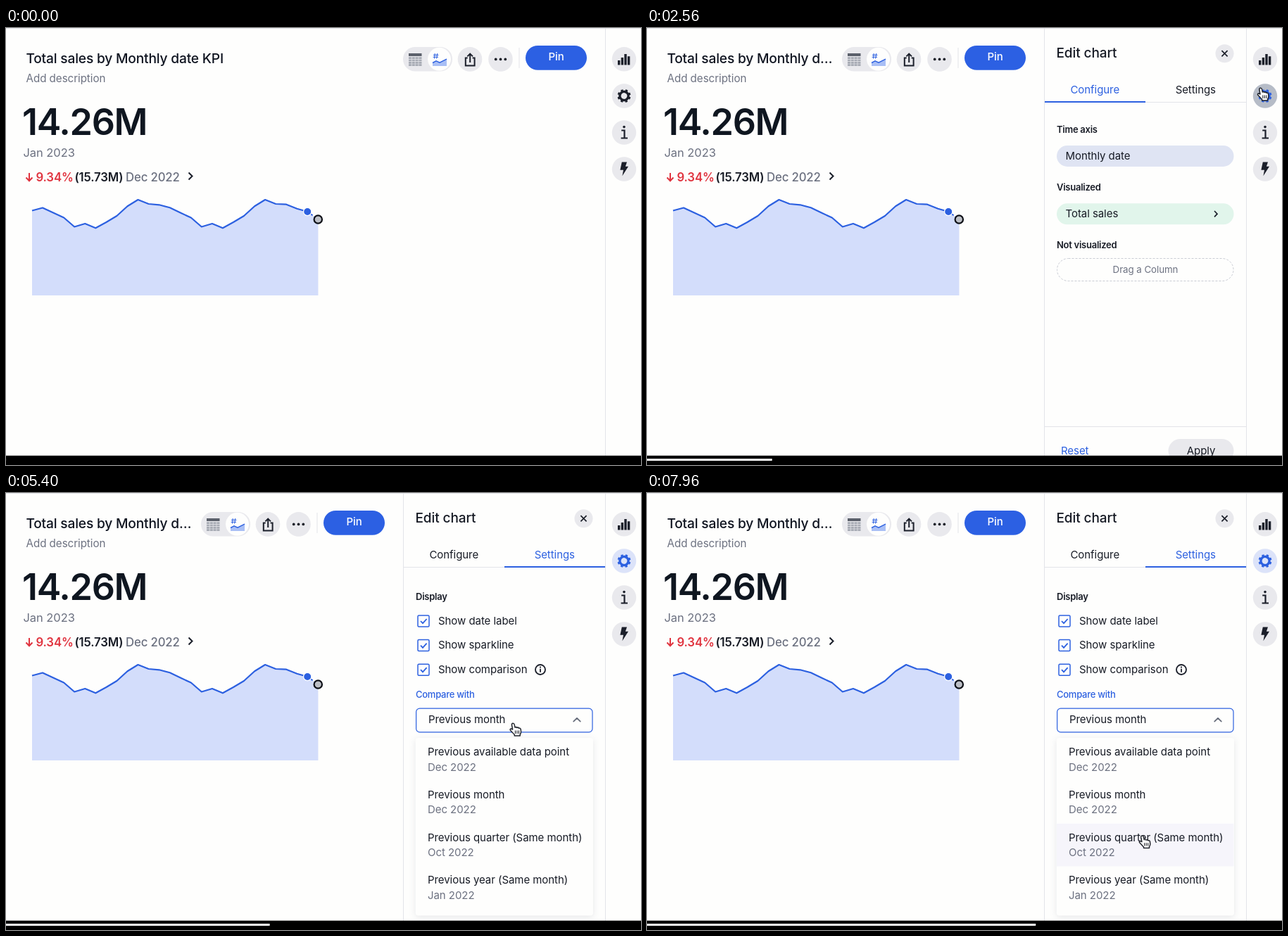
Animation, 902 px wide and 621 px high, one loop 8 s. Source, as an HTML page:

```html
<!DOCTYPE html>
<html lang="en">
<head>
<meta charset="utf-8">
<title>KPI chart settings</title>
<style>
  html, body { margin: 0; width: 100%; height: 100%; overflow: hidden; background: #fefefd; }
  svg { display: block; width: 100%; height: 100%; }
  text {
    font: 400 15px Inter, "Liberation Sans", sans-serif;
    font-optical-sizing: none;
    letter-spacing: -.004em;
    fill: #171b25;
    white-space: pre;
  }
  .title { font-size: 19.2px; font-weight: 500; letter-spacing: -.01em; fill: #0f1420; }
  .total { font-size: 52px; font-weight: 600; letter-spacing: -.025em; fill: #0f1620; }
  .delta { font-size: 16.8px; font-weight: 600; letter-spacing: -.01em; }
  .head { font-size: 19px; font-weight: 500; letter-spacing: -.005em; }
  .label { font-size: 13px; font-weight: 600; letter-spacing: -.02em; }
  .mute { fill: #6c7180; }
  .mid { text-anchor: middle; }
  .blue { fill: #2c60e0; }
  .line { fill: none; stroke: #1b1f2a; stroke-width: 2; }
  .rule { stroke: #e3e4e9; }
  .field { fill: #fefefd; stroke: #b9bfcb; stroke-width: 1.2; }
  .disc { fill: #e9e9ed; }
  .chev { fill: none; stroke: #656b79; stroke-width: 1.7; stroke-linecap: round; stroke-linejoin: round; }
  #menu > rect { filter: drop-shadow(0 2px 5px rgba(30, 35, 60, .11)); }
</style>
</head>
<body>
<svg viewBox="0 0 902 621" preserveAspectRatio="none">
  <rect width="902" height="621" fill="#fefefd"/>

  <text id="title" class="title" x="28.4" y="50.3"></text>
  <text class="mute" x="28.5" y="77" style="font-size:15.2px">Add description</text>
  <text class="total" x="23" y="152">14.26M</text>
  <text class="mute" x="24.5" y="183" style="font-size:16.5px">Jan 2023</text>
  <path class="line" d="M33 206V217M28.5 212.5L33 217.3L37.5 212.5" style="stroke:#e0343f"/>
  <text class="delta" x="42.5" y="218" style="fill:#e0343f">9.34%</text>
  <text class="delta" x="97.5" y="218">(15.73M)</text>
  <text class="delta mute" x="170" y="218" style="font-weight:500">Dec 2022</text>
  <path class="line" d="M259.5 205.5l5 5l-5 5"/>

  <path id="area" fill="#d3ddfb"/>
  <path id="spark" fill="none" stroke="#2c60e0" stroke-width="2.2" stroke-linejoin="round"/>
  <path id="tail" fill="none" stroke="#2c60e0" stroke-width="2" stroke-dasharray="3 3"/>
  <circle cx="428.2" cy="261" r="5.6" fill="#2c60e0" stroke="#fff" stroke-width="1.2"/>
  <circle cx="443.3" cy="272" r="5.7" fill="#bcbfc6" stroke="#0c0f16" stroke-width="2.2"/>

  <g id="tools">
    <rect class="disc" x="564" y="27" width="70" height="34.5" rx="17.2"/>
    <circle cx="615.5" cy="44.3" r="16.5" fill="#fefefd"/>
    <path fill="#5b606b" d="M572 36h18.5v4h-18.5z"/>
    <path fill="none" stroke="#a7abb4" stroke-width="2.6" d="M572 42.6h18.5M572 46h18.5M572 49.4h18.5M572 52.6h18.5"/>
    <path stroke="#e3e3e8" stroke-width=".8" d="M576.4 41v13M581.2 41v13M586 41v13"/>
    <path fill="#a9bff5" d="M606 50l5-2.5l5 2l10-5v9.5h-20z"/>
    <path fill="none" stroke="#2c60e0" stroke-width="1.5" d="M606 49.5l5-2.6l5 2.2l10-5"/>
    <path fill="none" stroke="#2c60e0" stroke-width="1" d="M609.3 36l-.9 7.6M612.6 36l-.9 7.6M607 38.4h7.4M606.6 41.3h7.4"/>
    <circle class="disc" cx="659" cy="44.4" r="17.3"/>
    <path class="line" d="M655.7 42.6H652.8V53.5H665.6V42.6H662.6M659.2 49V37M655.4 40.4L659.2 36.6L663 40.4"/>
    <circle class="disc" cx="702.5" cy="44.4" r="17.3"/>
    <g fill="#1b1f2a"><circle cx="695.7" cy="44.4" r="1.9"/><circle cx="702.5" cy="44.4" r="1.9"/><circle cx="709.3" cy="44.4" r="1.9"/></g>
    <path class="rule" d="M729 28V57"/>
    <rect x="738" y="25" width="87" height="34.8" rx="17.4" fill="#2c60e3"/>
    <text class="mid" x="781.5" y="46.4" style="fill:#fff;font-weight:500">Pin</text>
  </g>

  <g id="panel">
    <rect x="564" y="0" width="288" height="608" fill="#fefefd"/>
    <path class="rule" d="M564.5 1V608M565 105.5H851"/>
    <text class="head" x="581.5" y="42">Edit chart</text>
    <circle class="disc" cx="820.5" cy="36.2" r="13"/>
    <path class="line" d="M816.4 32.1l8.2 8.2M824.6 32.1l-8.2 8.2" style="stroke-width:1.7"/>
    <text id="tabA" class="mid" x="636.3" y="92.5">Configure</text>
    <text id="tabB" class="mid" x="779.3" y="92.5">Settings</text>
    <rect id="underline" y="104" width="143" height="2" fill="#2c60e0"/>

    <g id="configure">
      <text class="label" x="582" y="148.5">Time axis</text>
      <rect x="582" y="167" width="251.5" height="30" rx="15" fill="#dfe4f3"/>
      <text x="594.5" y="186.5">Monthly date</text>
      <text class="label" x="582" y="231">Visualized</text>
      <rect x="582" y="249.3" width="251.5" height="30" rx="15" fill="#e1f5eb"/>
      <text x="594.5" y="269">Total sales</text>
      <path class="line" d="M806 260l4 4.2l-4 4.2" style="stroke-width:1.7"/>
      <text class="label" x="582" y="313.4">Not visualized</text>
      <rect x="582.5" y="327.5" width="250.5" height="32" rx="16" fill="none" stroke="#c9ccd4" stroke-dasharray="3 2"/>
      <text class="mid mute" x="708" y="347.5" style="font-size:13.3px">Drag a Column</text>
      <path class="rule" d="M565 566.5H851"/>
      <text class="blue" x="588" y="605.7">Reset</text>
      <rect class="disc" x="740.5" y="584" width="93" height="34" rx="17"/>
      <text class="mid" x="787" y="605.7">Apply</text>
    </g>

    <g id="settings">
      <text class="label" x="582" y="151.5">Display</text>
      <g id="checks"></g>
      <circle cx="759" cy="251" r="7" fill="none" stroke="#1b1f2a" stroke-width="1.8"/>
      <path d="M759 249.8V254.8M759 246.6V248.4" stroke="#1b1f2a" stroke-width="1.8"/>
      <text id="compare" class="label" x="582" y="291.3">Compare with</text>
      <rect id="select" class="field" x="582.6" y="306.2" width="250.4" height="33.6" rx="5"/>
      <text x="600" y="327.4">Previous month</text>
      <path id="selChev" class="chev"/>
      <text class="label" x="582" y="369.5">Color</text>
      <g id="colors"></g>
      <text class="label" x="582" y="508.2">Max data points</text>
      <rect class="field" x="582.6" y="518.6" width="250.4" height="33.6" rx="5"/>
      <text x="600" y="541">5000</text>
      <text class="mute" x="582" y="567.8" style="font-size:12.7px">Positive values up to 20,000</text>
    </g>

    <g id="menu">
      <rect x="581.7" y="348" width="252.3" height="252.5" rx="4" fill="#fefefd"/>
      <path id="hover" d="M582 0h251.5v60.7h-251.5z" fill="#f6f5fb"/>
      <g id="options"></g>
    </g>
    <g id="tip">
      <rect x="-64" y="-17" width="128" height="34" rx="2" fill="#42454f"/>
      <text class="mid" x="0" y="4.4" style="font-size:12.6px;fill:#fff">Previous month</text>
    </g>
  </g>

  <path class="rule" d="M851.5 1V608M0 .5H902"/>
  <circle class="disc" cx="878" cy="44.3" r="17.2"/>
  <path fill="#1b1f2a" d="M869 46h3.4v6.5h-3.4zM873.7 42h3.4v10.5h-3.4zM878.3 37h3.4v15.5h-3.4zM882.9 40.3h3.4v12.2h-3.4z"/>
  <circle id="gearBack" cx="878" cy="96.5" r="17.2"/>
  <g id="gear" fill="none" transform="translate(878 96.5) rotate(11.25)">
    <circle r="6.1" stroke-width="3.4"/>
    <circle r="8" stroke-width="3" stroke-dasharray="3.1416"/>
  </g>
  <circle class="disc" cx="878" cy="148.5" r="17.2"/>
  <path class="line" d="M874.2 145.5H878.5V156.5M873.6 156.5H883" style="stroke-width:2.2"/>
  <circle cx="878" cy="140.6" r="1.8" fill="#1b1f2a"/>
  <circle class="disc" cx="878" cy="200.5" r="17.2"/>
  <path fill="#1b1f2a" d="M874.8 190.5H882L879.9 196.8H884L875.4 210.2L877 201.8H872.4z"/>

  <rect y="607.7" width="902" height="14" fill="#000"/>
  <rect id="progress" y="612" height="3" fill="#fff"/>

  <g id="cursor">
    <path id="arrow" d="M0 0V15.5L3.6 12.2L6.2 18L8.8 16.9L6.3 11.2H11.2Z" fill="#111" stroke="#fff" stroke-width="1.1"/>
    <g id="hand" transform="translate(-5 -1)" stroke="#22252c" stroke-width="1.5" stroke-linejoin="round">
      <path fill="#fff" d="M4.4 9.6L3.2 3.4Q3 1 4.8 1T7 3L7.7 6.7Q9.4 5.6 10.4 7.1Q12.3 6.2 13.1 7.8Q15.4 7.2 16 9.5L16.3 13Q16.2 15 15 16.6V18.6H7V17Q5.5 15.8 4 13.8L1 10.6Q.5 8.7 2.3 8.6Z"/>
      <path fill="none" stroke-width="1.1" d="M8.2 11.2V15.6M10.7 11.2V15.6M13.2 11.2V15.6"/>
    </g>
  </g>
</svg>
<script>
const LOOP = 8000, FULL = 13005;
const PANEL_AT = 2200, SETTINGS_AT = 3700, MENU_AT = 4620;
const ROW_TOP = 348.3, ROW = 60.7;
const $ = id => document.getElementById(id);
const show = (id, on) => $(id).style.display = on ? '' : 'none';
const set = (id, attrs) => { for (const k in attrs) $(id).setAttribute(k, attrs[k]); };
const ramp = (t, a, b) => Math.min(1, Math.max(0, (t - a) / (b - a)));

// sparkline
const heights = [259.5, 255.5, 262.5, 269.5, 282.5, 278, 284.3, 276, 267, 253.3, 244, 250, 251.3, 255.3,
  262.5, 269.5, 282.5, 278, 284.3, 276, 267, 253.3, 244, 250, 250.7, 256.7, 261, 272];
const points = heights.map((y, i) => `${(37 + i * 15.05).toFixed(1)} ${y}`);
set('area', { d: `M${points.join('L')}V380H37Z` });
set('spark', { d: 'M' + points.slice(0, -1).join('L') });
set('tail', { d: 'M' + points.slice(-2).join('L') });

// repeated controls
$('checks').innerHTML = ['Show date label', 'Show sparkline', 'Show comparison'].map((s, i) => {
  const y = 182 + i * 34.6;
  return `<rect x="585" y="${y - 8}" width="16" height="16" rx="1.5" fill="none" stroke="#2c60e0" stroke-width="1.5"/>
    <path d="M589 ${y}l3 3.2l5.6-6.2" fill="none" stroke="#2c60e0" stroke-width="1.8"/>
    <text x="614" y="${y + 4.7}">${s}</text>`;
}).join('');

$('colors').innerHTML = [['Positive', '#45b77b'], ['Negative', '#d9414c']].map(([s, c], i) => {
  const y = 401 + i * 52;
  return `<rect class="field" x="582.6" y="${y - 16.8}" width="66" height="33.6" rx="5"/>
    <rect x="592.5" y="${y - 8}" width="16" height="16" rx="3" fill="${c}"/>
    <path class="chev" d="M622 ${y - 2.4}l4.8 4.8l4.8-4.8"/>
    <text x="661.5" y="${y + 4.4}">${s} change color</text>`;
}).join('');

$('options').innerHTML = [
  ['Previous available data point', 'Dec 2022'], ['Previous month', 'Dec 2022'],
  ['Previous quarter (Same month)', 'Oct 2022'], ['Previous year (Same month)', 'Jan 2022']
].map(([a, b], i) => {
  const y = ROW_TOP + i * ROW;
  return `<text x="599" y="${y + 24.8}">${a}</text><text class="mute" x="599" y="${y + 46.4}">${b}</text>`;
}).join('');

// pointer path: time, x, y
const path = [
  [100, 846, 24], [860, 868, 68], [1200, 874, 89], [2520, 874, 89], [2760, 843, 42], [3200, 790, 92],
  [3760, 790, 92], [4250, 724, 309], [4800, 724, 309], [5030, 722, 316], [5840, 718, 342],
  [6300, 713, 367], [6700, 711, 373], [7250, 707, 433], [7600, 707, 433], [7920, 703.5, 487], [8000, 703.5, 487]
];

function pointer(t) {
  let i = 1;
  while (i < path.length - 1 && t > path[i][0]) i++;
  const [t0, x0, y0] = path[i - 1], [t1, x1, y1] = path[i];
  const k = ramp(t, t0, t1), e = k * k * (3 - 2 * k);
  return [x0 + (x1 - x0) * e, y0 + (y1 - y0) * e];
}

function draw(t) {
  const open = t >= PANEL_AT, settings = t >= SETTINGS_AT, menu = t >= MENU_AT;
  const [x, y] = pointer(t);
  const inside = (l, top, r, b) => x >= l && x <= r && y >= top && y <= b;
  const onGear = Math.hypot(x - 878, y - 96.5) < 17.2;
  const onTab = open && inside(708, 72, 851, 105);
  const onSelect = settings && inside(582, 306, 834, 340);
  const onMenu = menu && inside(582, ROW_TOP, 834, 600);

  $('title').textContent = open ? 'Total sales by Monthly d…' : 'Total sales by Monthly date KPI';
  set('tools', { transform: `translate(${open ? -287 : 0} 0)` });
  show('panel', open);
  show('configure', !settings);
  show('settings', settings);
  show('menu', menu);

  $('tabA').style.fill = settings ? '#171b25' : '#2c60e0';
  $('tabB').style.fill = settings || onTab ? '#2c60e0' : '#171b25';
  set('underline', { x: settings ? 708 : 565 });

  $('compare').style.fill = menu ? '#2c60e0' : '#171b25';
  $('compare').style.fontWeight = menu ? 500 : 600;
  $('select').style.stroke = menu ? '#2c60e0' : onSelect ? '#8f96a6' : '#b9bfcb';
  set('selChev', { d: menu ? 'M806.2 324.6l4.8-4.8l4.8 4.8' : 'M806.2 320.2l4.8 4.8l4.8-4.8' });
  show('hover', onMenu);
  set('hover', { transform: `translate(0 ${ROW_TOP + ROW * Math.floor((y - ROW_TOP) / ROW)})` });

  const fade = ramp(t, 7400, 7600) * (1 - ramp(t, 7730, 7820));
  show('tip', fade > 0);
  set('tip', { opacity: fade, transform: `translate(708.2 397) scale(${.96 + .04 * fade})` });

  set('gearBack', { fill: onGear ? '#b6bcc7' : open ? '#dce3f9' : '#e9e9ed' });
  set('gear', { stroke: open ? '#2c60e0' : '#1b1f2a' });
  set('progress', { width: 902 * t / FULL });

  const pointing = onGear || onTab || onSelect || onMenu;
  show('cursor', t >= 100);
  set('cursor', { transform: `translate(${x} ${y})` });
  show('hand', pointing);
  show('arrow', !pointing);
}

function tick() {
  draw(performance.now() % LOOP);
  requestAnimationFrame(tick);
}
tick();
</script>
</body>
</html>
```
